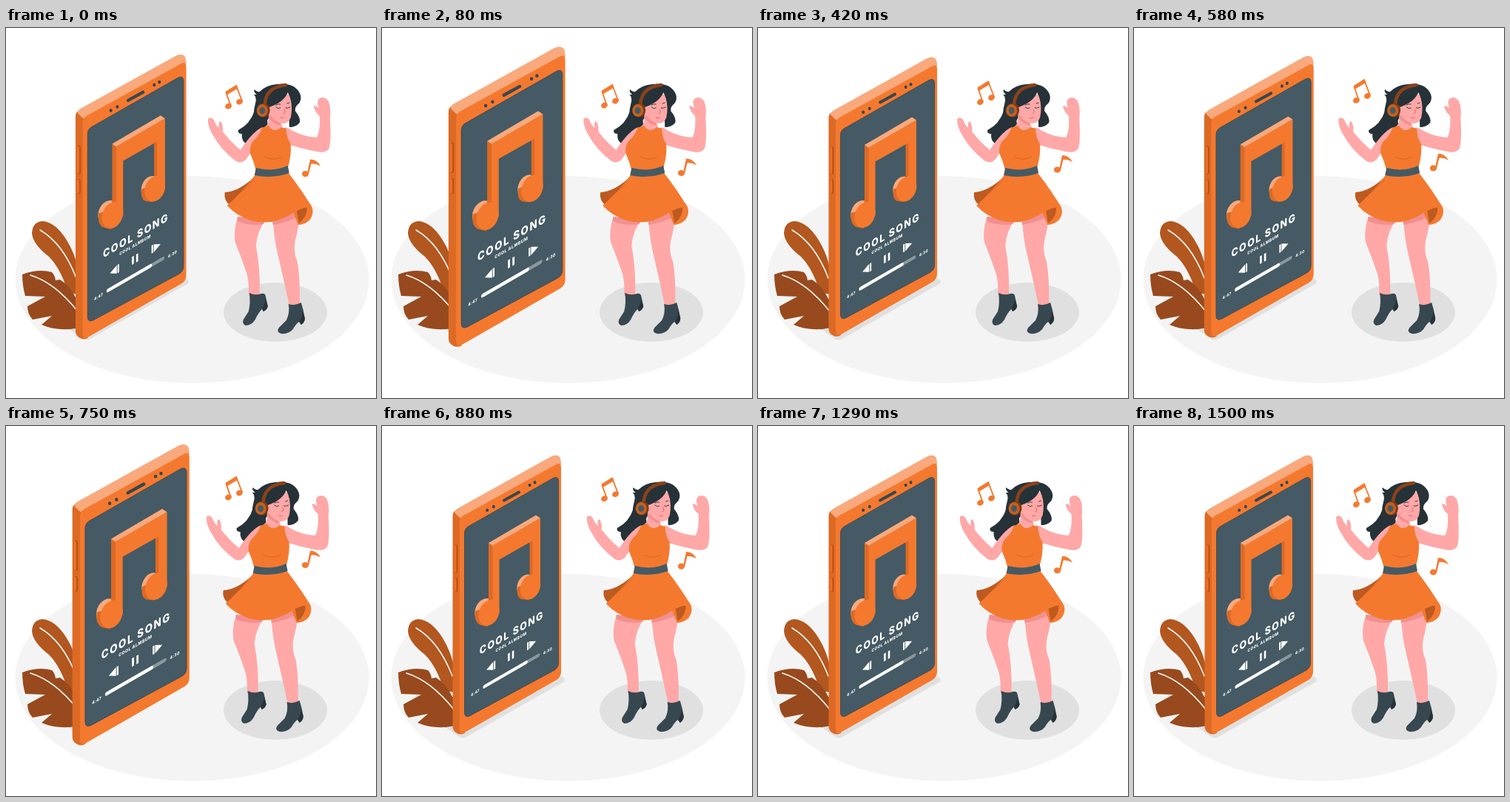
Write an HTML page that moves like this. It is 500 by 500 pixels and loops after 1540 ms.

```html
<!DOCTYPE html>
<html lang="en">
<head>
<meta charset="utf-8">
<title>Dancing to a cool song</title>
<style>
  html, body { margin: 0; width: 100%; height: 100%; overflow: hidden; background: #fff; }
  svg { display: block; width: 100vw; height: 100vh; }
  text { font-family: Inter, sans-serif; font-weight: 800; text-anchor: middle; fill: #fff; }
  .orange { fill: #f4792f; }
  .light { fill: #f9a97c; }
  .deep { fill: #dc6a25; }
  .brown { fill: #b2571f; }
  .skin { fill: #ffa8a7; }
  .blush { fill: #f28f8f; }
  .hair { fill: #263238; }
  .slate { fill: #455a64; }
  .dark { fill: #37474f; }
  .line { fill: none; stroke-linecap: round; stroke-linejoin: round; }
</style>
</head>
<body>
<svg viewBox="0 0 500 500">
  <ellipse cx="251.500" cy="340" rx="239" ry="140" fill="#f4f4f4"/>
  <ellipse cx="364" cy="384" rx="70" ry="40" fill="#e0e0e0"/>
  <path d="M82 405L104 420Q109 423 114 420L245 346Q249 343 245 340L236 334Z" fill="#e0e0e0"/>

  <g id="leaves">
    <path class="brown" d="M84 358Q74 325 58 309Q36 292 35 277Q36 262 49 261Q66 262 81 285Q93 304 97 325L112 362Z"/>
    <path d="M22 333Q44 325 62 330Q66 334 67 341L73 340Q86 348 95 366L110 370V402Q76 413 48 401L62 389L36 394Q29 387 29 376L53 363L26 362Q22 348 22 333Z" fill="#984a1e"/>
    <path class="line" d="M46 273Q77 291 95 338M33 334Q66 344 97 383" stroke="#fff" stroke-width="1.500"/>
  </g>

  <g id="phone">
    <path class="deep" d="M95.500 121Q95.500 116 100 114L112 122V415Q106 418 101 415Q95.500 412 95.500 406Z"/>
    <path class="light" d="M98 117Q99 113 102 111.500L228 41.500Q236 37.500 240 42Q242 45 242 52L112 126L105 124Z"/>
    <path class="orange" d="M105 130Q105 124 110 121L235 52Q242 48 242 56V332Q242 339 236 343L112 414Q105 418 105 408Z"/>
    <g class="line" stroke="#a9470f" stroke-width="4.500">
      <path d="M99.800 162.500V196M99.800 207V222"/>
      <path d="M99 162.500V196M99 207V222" stroke="#ea7027" stroke-width="3.400"/>
    </g>
    <g class="line" stroke="#37474f" stroke-width="4">
      <path d="M165 100.500L185 89.500"/>
      <path d="M142.200 113.500V114M150.800 108.700V109.200M199.700 79.700V80.200M206.500 76V76.500"/>
    </g>
    <path class="slate" d="M111.500 145Q111.500 138.500 117 135.500L231 70.500Q238.500 67 238.500 75V320Q238.500 327 232 330.500L119 391.500Q111.500 395 111.500 387Z" stroke="#37474f" stroke-width=".8"/>

    <g id="bigNote">
      <ellipse class="light" cx="139" cy="249.500" rx="13" ry="17" transform="rotate(22 139 249.500)"/>
      <path class="deep" d="M126 250Q124 265 133 269L143 271L139 246Z"/>
      <ellipse class="light" cx="195" cy="216" rx="12" ry="16" transform="rotate(22 195 216)"/>
      <path class="deep" d="M183 218Q181 231 188 234L198 235L194 213Z"/>
      <path class="deep" d="M144 158L150 161V240L144 236ZM199.500 157L205 153V203L199.500 200Z"/>
      <path class="light" d="M144 158L208 120.500L214 124.500L150 162Z"/>
      <path class="orange" d="M149.500 161.500L214 124.500V218H203.500V155L158.500 180.500V253H149.500Z"/>
      <ellipse class="orange" cx="144.500" cy="252.500" rx="13.300" ry="18" transform="rotate(22 144.500 252.500)"/>
      <ellipse class="orange" cx="200.500" cy="217.500" rx="13" ry="17.500" transform="rotate(22 200.500 217.500)"/>
    </g>

    <g transform="matrix(.866 -.5 0 1 174 0)">
      <text x="1.500" y="285" font-size="14.300" letter-spacing="1.600">COOL SONG</text>
      <text x=".5" y="294" font-size="5.600" font-weight="700" letter-spacing=".5">COOL ALMBUM</text>
      <text x="-55.500" y="334.500" font-size="5.400" letter-spacing=".3">4:47</text>
      <text x="57.500" y="334.500" font-size="5.400" letter-spacing=".3">4:30</text>
      <path d="M-38 310.500L-27.500 305V316ZM-26.500 305H-24V316H-26.500ZM-4.500 305.500H-1.500V316H-4.500ZM2 305.500H5V316H2ZM25.500 305.500H28V316H25.500ZM29 305.500L39.500 310.500L29 316Z" fill="#fff"/>
      <g class="line" stroke-width="4.600">
        <path d="M-41 331.500H43" stroke="#8c999f"/>
        <path d="M-41 331.500H24" stroke="#fff"/>
      </g>
    </g>
  </g>

  <g id="dancer">
    <path class="hair" d="M350 90Q337 98 336 112Q330 130 314 138Q313 143 319 143Q318 153 326 157Q340 148 354 132ZM382 92L397 100Q390 107 391 112Q399 122 397 128Q392 134 383 134Z"/>
    <path class="skin" d="M313 256Q307 276 310 290Q319 312 326 333Q329 345 328 361H343Q344 325 338 294Q340 273 352 258ZM361 258Q362 284 368 308Q376 342 383 375H397Q398 340 394 316Q388 303 391 287Q396 270 397 250Z"/>
    <path class="blush" d="M313 255L352 258L348 265Q330 268 313 261ZM360 258L396 248V254Q384 262 361 266Z"/>

    <path class="dark" d="M329 358Q337 362 345 359Q350 358 351 362L354 376Q353 381 348 383L346 380Q341 385 337 394Q332 402 324 402Q319 400 321 394L328 383Q331 371 329 358Z"/>
    <path class="dark" d="M382 373Q390 376 399 371Q402 380 404 392Q404 398 399 401L396 397Q392 400 388 407Q382 414 372 413Q365 411 369 405L379 395Q384 385 382 373Z"/>
    <path class="hair" d="M347 378Q350 374 351 366L354 376Q353 381 348 383ZM397 396Q401 390 401 382L404 392Q404 398 399 401Z"/>

    <path d="M334 203Q314 221 296 222Q294 232 302 239L332 214Z" fill="#bd5a20"/>
    <path class="orange" d="M382 204L412 239Q418 248 411 259Q404 266 395 266L385 240Z"/>
    <path d="M393 247Q402 243 407 241Q408 255 396 264Z" fill="#bd5a20"/>
    <path class="orange" d="M337 198Q326 215 299 240Q312 254 331 260Q350 265 367 260Q384 254 394 246Q405 241 414 243Q402 222 382 196Z"/>
    <path class="line" d="M335 205Q326 216 314 225" stroke="#d9651f" stroke-width=".8"/>

    <path class="skin" d="M372 136Q380 132 386 138Q402 147 420 148Q425 140 424 119Q417 113 416 105Q419 105 423 108Q419 98 424 95Q431 92 436 99Q440 110 438 122Q440 150 437 162Q433 170 420 167Q400 163 380 157Z"/>
    <path class="skin" d="M347 134Q334 139 317 165Q303 153 293 140Q294 133 291 127Q287 124 288 135Q284 132 281 124Q277 119 273 123Q273 134 280 145Q290 164 311 180Q319 184 325 177L336 161Q348 150 347 134Z"/>
    <path class="skin" d="M355 110L371 122L374 138Q360 145 347 135Q355 132 355 125Z"/>
    <path class="orange" d="M346 135Q350 133 355 132Q362 143 372 134L379 136Q379 148 385 157Q386 172 381 189Q360 197 338 192Q335 180 330 169Q329 158 335 152Q343 145 346 135Z"/>
    <path class="line" d="M350 174Q362 181 373 174" stroke="#d9651f"/>
    <path class="slate" d="M338 189Q362 195 381 186L383 196Q360 204 336 199Z"/>

    <path class="blush" d="M357 117Q363 126 371 128V132Q361 129 356 122Z"/>
    <path class="skin" d="M356 96Q370 80 384 92Q388 107 385 121Q382 129 374 129Q361 126 356 115Z"/>
    <path class="hair" d="M381 87Q376 100 356 107L355 122Q351 130 345 133Q338 136 336 142Q332 120 338 98Q338 92 335 90L339 90Q334 86 336 83Q339 87 343 86Q352 77 366 76Q391 73 398 90Q401 101 390 106L387 116Q388 100 381 87Z"/>
    <path class="line" d="M350 102Q352 80 378 77" stroke="#8a421a" stroke-width="4.500"/>
    <ellipse cx="348.500" cy="111" rx="8.500" ry="9.500" fill="#7d3b16"/>
    <ellipse cx="346.500" cy="111.500" rx="7.500" ry="8.500" fill="#c4601f"/>
    <ellipse class="slate" cx="346.500" cy="111.500" rx="3.900" ry="4.500"/>
    <path class="line" d="M365 107Q368 110 371 108M378 108Q381 109 384 107M365 104Q368 102 371 103M380 102L383 101" stroke="#263238" stroke-width=".9"/>
    <path class="line" d="M376 110Q379 115 375 116M371 121Q374 123 376 121" stroke="#e0686c"/>
  </g>

  <g id="notes" class="orange">
    <ellipse cx="300.500" cy="106" rx="4.500" ry="3.800" transform="rotate(-25 300.500 106)"/>
    <ellipse cx="315.500" cy="100" rx="4.500" ry="3.800" transform="rotate(-25 315.500 100)"/>
    <path class="line" d="M303.500 105L297.500 88L311.500 79.500L319 99" stroke="#f4792f" stroke-width="1.800"/>
    <path d="M296.500 86.500L311.500 77L313.500 82L298.500 91Z"/>
    <ellipse cx="404.500" cy="197.500" rx="4.600" ry="4"/>
    <path d="M407 197L411 178Q420 178 425 187Q418 183 412.500 184L409 198Z"/>
  </g>
</svg>
<script>
const LOOP = 1540, STEP = 1000 / 24, CYCLE = 1500, LEAD = 31;
const part = id => document.getElementById(id);
const phone = part('phone'), dancer = part('dancer'), notes = part('notes');

// Keyframes as [percent, value] pairs, joined by straight lines.
const beat = [[0, 1], [10, 1.1], [30, 1], [40, 1], [50, 1.1], [60, 1], [100, 1]];
const shake = [[0, 0], [10, -1], [20, 2], [30, -4], [40, 4], [50, -4], [60, 4], [70, -4], [80, 2], [90, -1], [100, 0]];
const float = [[0, 0], [50, -10], [100, 0]];

function valueAt(keys, p) {
  const i = Math.max(1, keys.findIndex(k => k[0] >= p));
  const [p0, v0] = keys[i - 1], [p1, v1] = keys[i];
  return v0 + (v1 - v0) * (p - p0) / (p1 - p0);
}

function draw(now) {
  // The motion advances 24 times a second.
  const step = Math.min(36, Math.floor((now % LOOP + 4) / STEP));
  const p = Math.min(100, (step * STEP + LEAD) / CYCLE * 100);
  phone.setAttribute('transform', `translate(169 228.3) scale(${valueAt(beat, p)}) translate(-169 -228.3)`);
  dancer.setAttribute('transform', `translate(${valueAt(shake, p)} 0)`);
  notes.setAttribute('transform', `translate(0 ${valueAt(float, p)})`);
}

const start = performance.now();
function tick() {
  draw(performance.now() - start);
  requestAnimationFrame(tick);
}
tick();
</script>
</body>
</html>
```
